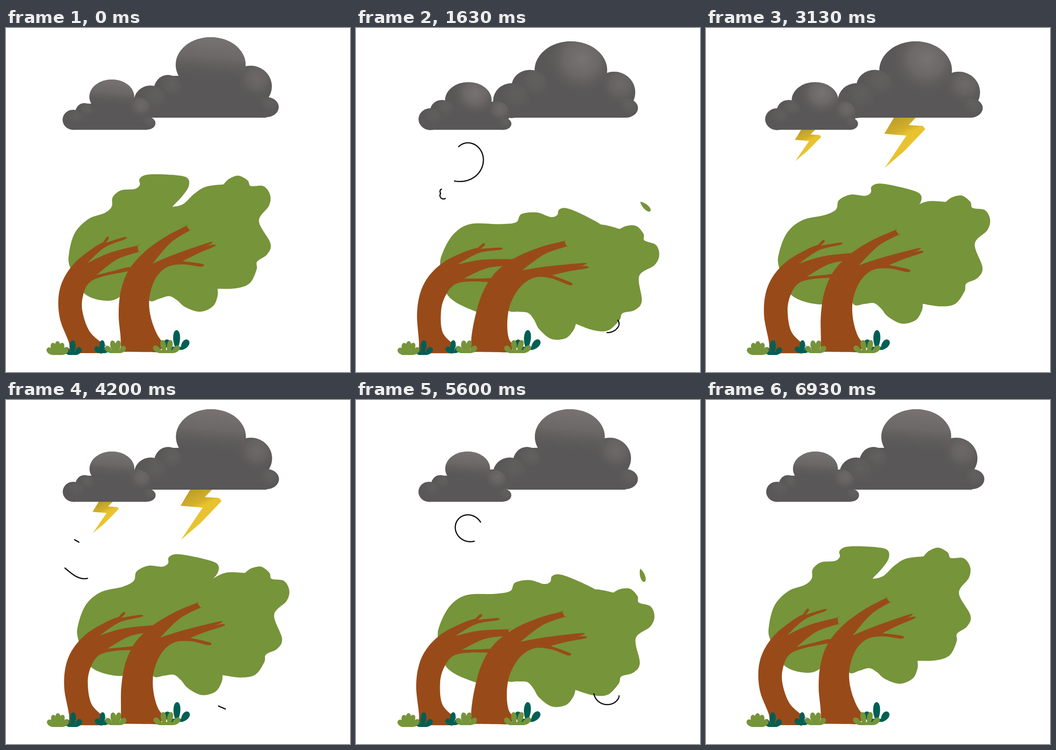
Animation of 748x748 px, one loop 7010 ms. Source, as an HTML page with a canvas:

```html
<!DOCTYPE html>
<html lang="en">
<head>
<meta charset="utf-8">
<title>Storm</title>
<style>
html, body { margin: 0; width: 100%; height: 100%; overflow: hidden; background: #fff; }
canvas { display: block; width: 100vw; height: 100vh; }
</style>
</head>
<body>
<canvas id="stage" width="748" height="748"></canvas>
<script>
const ctx = document.getElementById('stage').getContext('2d');
const LOOP = 7010, DEG = Math.PI / 180;
const GREEN = '#76943a', TEAL = '#005f54', BROWN = '#984b19', GREY = '#595757';

// Outlines of the resting trees; "!" marks a sharp corner.
const crownLeft = outline('217,593 170,577 140,522 137,490 150,445 180,415 215,402 230,388 232,368 250,353 280,350 291,341 290,329 302,320 330,318 378,321 396,328 397,345 383,366 362,388! 380,470 270,540 250,582');
const crownRight = outline('362,389! 385,383 410,360 435,345 473,340! 485,328 505,321 525,331 530,342 537,344 560,344 574,362 572,386 550,420 575,468 568,492 546,508 545,525 530,555 500,566 460,567! 460,583 450,605 422,617 390,607 372,592 355,583 335,588 312,593 300,560 310,460');
const trunkLeft = outline('136,707! 137,685 118,635 114,588 124,548 150,510 190,478 211,466! 220,454 224,457 217,467! 256,455 259,459 215,477 177,511! 225,489 286,473! 288,487! 240,504 197,537! 230,529 267,520 268,528 215,539 182,553 168,580 166,615 182,660 215,690! 205,707!');
const trunkRight = outline('250,704! 249,670 245,625 249,575 266,528 300,488 345,455 392,430! 400,440! 358,467 319,512! 370,491 443,466 445,470 434,475! 452,471 453,475 418,490 384,507! 427,513 424,519 385,514 350,520 325,545 312,585 314,625 328,665 346,690! 330,705!');

// How far each part leans, from 0 (rest) to 1 (strongest gust).
const BEATS = [0, 800, 1630, 3130, 4200, 5030, 5400, 6100, 6930];
const lean = {
  crownLeft: [0, .6, 1, .43, .39, .79, .95, .62, 0],
  crownRight: [0, .6, 1, .44, .42, .69, .9, .585, 0],
  trunkLeft: [0, .6, 1, .6, .62, .9, .95, .62, 0],
  trunkRight: [0, .5, 1, .32, .38, .84, .95, .79, 0]
};

// Curls of wind, one per gust: start times and duration in ms.
const winds = [
  { x: 277, y: 287, size: 1, fade: .45, from: 165, starts: [690, 4180], span: 2060 },
  { x: 198, y: 364, size: .55, fade: 1, from: 180, starts: [650, 4000], span: 1290 },
  { x: 572, y: 643, size: .88, fade: .45, from: 157, starts: [90, 4170], span: 1750 }
];

// Leaves are at x, y at time t and drift to the right.
const leaves = [
  { t: 1630, x: 629, y: 388, vy: -.06, angle: .75, colour: GREEN },
  { t: 2000, x: 660, y: 600, vy: .06, angle: .4, colour: GREEN },
  { t: 5030, x: 657, y: 403, vy: -.05, angle: 1, colour: TEAL },
  { t: 5030, x: 606, y: 508, vy: .04, angle: -.9, colour: GREEN },
  { t: 5030, x: 520, y: 404, vy: -.04, angle: .7, colour: GREEN },
  { t: 6100, x: 687, y: 635, vy: .12, angle: .15, colour: GREEN }
];

// colour, centre, ground, half width, height, blades
const bushes = [
  [TEAL, 145, 711, 17, 32, 3],
  [GREEN, 112, 711, 22, 30, 5],
  [TEAL, 209, 707, 14, 28, 3],
  [GREEN, 238, 707, 21, 29, 4],
  [TEAL, 371, 700, 25, 43, 3],
  [GREEN, 349, 707, 28, 30, 4]
];

// Ellipses of a cloud, the dome last.
const cloudShapes = {
  sharp: [[314, 160, 36, 35], [352, 136, 31, 34], [532, 127, 46, 45], [566, 172, 27, 22], [445, 80, 76, 60]],
  round: [[318, 158, 40, 38], [358, 127, 40, 36], [541, 140, 46, 45], [566, 174, 27, 21], [447, 92, 79, 63]]
};
const bolt = outline('404,188 379,230 427,234 380,304 422,268 468,220 463,213 432,211 454,188');

function outline(text) {
  return text.split(' ').flatMap(s => {
    const p = s.split(',').map(parseFloat);
    return s.endsWith('!') ? [p, p] : [p];
  });
}

function smooth(a, b, v) {
  const u = Math.max(0, Math.min(1, (v - a) / (b - a)));
  return u * u * (3 - 2 * u);
}

function leanAt(values, t) {
  const i = BEATS.findIndex(b => b > t);
  if (i < 0) return 0;
  return values[i - 1] + (values[i] - values[i - 1]) * smooth(BEATS[i - 1], BEATS[i], t);
}

function turn([x, y], [px, py], degrees, grow = 1) {
  const c = Math.cos(degrees * DEG) * grow, s = Math.sin(degrees * DEG) * grow;
  return [px + c * (x - px) - s * (y - py), py + s * (x - px) + c * (y - py)];
}

function fillCurve(pts, colour) {
  const n = pts.length, at = i => pts[(i + n) % n];
  ctx.beginPath();
  ctx.moveTo(...pts[0]);
  for (let i = 0; i < n; i++) {
    const [a, p, q, c] = [at(i - 1), at(i), at(i + 1), at(i + 2)];
    ctx.bezierCurveTo(p[0] + (q[0] - a[0]) / 6, p[1] + (q[1] - a[1]) / 6,
      q[0] - (c[0] - p[0]) / 6, q[1] - (c[1] - p[1]) / 6, q[0], q[1]);
  }
  ctx.fillStyle = colour;
  ctx.fill();
}

function drawTrees(t) {
  const b = {};
  for (const part in lean) b[part] = leanAt(lean[part], t);
  const leftRoot = [170, 695], rightRoot = [262, 690];
  // the free side of the left crown swings further than its windward side
  fillCurve(crownLeft.map(p => {
    const free = smooth(180, 250, p[0]);
    return turn(p, leftRoot, b.crownLeft * (14.3 + 9.7 * free), 1 + .05 * free * Math.sqrt(b.crownLeft));
  }), GREEN);
  fillCurve(crownRight.map(p => turn(p, [268, 653], 21.5 * b.crownRight)), GREEN);
  const trunk = (pts, root, bend) => fillCurve(pts.map(p =>
    turn(p, root, 13.5 * bend * smooth(705, 640, p[1]), 1 + .02 * bend)), BROWN);
  trunk(trunkLeft, leftRoot, b.trunkLeft);
  trunk(trunkRight, rightRoot, b.trunkRight);
  return b.trunkRight;
}

function blade(x, y, tx, ty, w, colour) {
  const dx = tx - x, dy = ty - y, len = Math.hypot(dx, dy);
  const nx = -dy / len * w, ny = dx / len * w;
  ctx.beginPath();
  ctx.moveTo(x, y);
  ctx.bezierCurveTo(x + dx * .4 + nx, y + dy * .4 + ny, tx + nx * .8, ty + ny * .8, tx, ty);
  ctx.bezierCurveTo(tx - nx * .8, ty - ny * .8, x + dx * .4 - nx, y + dy * .4 - ny, x, y);
  ctx.fillStyle = colour;
  ctx.fill();
}

function drawBush([colour, x, y, w, h, n], sway) {
  ctx.fillStyle = colour;
  ctx.fillRect(x - w * .55, y - 7, w * 1.1, 7);
  for (let i = 0; i < n; i++) {
    const u = i / (n - 1) * 2 - 1;
    blade(x + u * w * .4, y, x + u * w + 3 * sway, y - h * (1 - .5 * u * u), 4 + h / 6, colour);
  }
}

function drawLeaves(t) {
  ctx.save();
  ctx.beginPath();
  ctx.rect(0, 0, 683, 748);
  ctx.clip();
  for (const leaf of leaves) {
    const dt = t - leaf.t;
    if (dt < -450 || dt > 700) continue;
    const a = leaf.angle + dt * .001, c = Math.cos(a) * 15, s = Math.sin(a) * 15;
    const x = leaf.x + .18 * dt, y = leaf.y + leaf.vy * dt;
    blade(x - c, y - s, x + c, y + s, 8, leaf.colour);
  }
  ctx.restore();
}

// A stroke running inwards along a spiral that keeps its right edge in place.
function drawWind({ x, y, size, fade, from, starts, span }, t) {
  const u = (t - starts[t < starts[1] ? 0 : 1]) / span;
  if (u <= 0 || u >= 1) return;
  const turns = 10.5, tail = turns * u ** 3, head = turns * Math.min(1, 1.05 * u);
  ctx.beginPath();
  for (let k = 0; k <= 80; k++) {
    const s = tail + (head - tail) * k / 80, a = from * DEG - s;
    const r = size * (Math.max(14, 46 - fade * s * s) + 19 * Math.exp(-2 * s));
    ctx.lineTo(x - r + r * Math.cos(a), y + r * Math.sin(a));
  }
  ctx.strokeStyle = '#0c0c0c';
  ctx.lineWidth = 2.6;
  ctx.lineCap = ctx.lineJoin = 'round';
  ctx.stroke();
}

function drawBolt(t) {
  if (t < 2900 || t >= 4400) return;
  const g = ctx.createLinearGradient(400, 190, 425, 245);
  g.addColorStop(0, '#b89a2a');
  g.addColorStop(.6, '#d3b02c');
  g.addColorStop(.8, '#e9c32f');
  ctx.save();
  ctx.beginPath();
  ctx.rect(340, 185, 160, 130 * Math.min(1, (t - 2850) / 180));
  ctx.clip();
  ctx.beginPath();
  bolt.forEach(p => ctx.lineTo(...p));
  ctx.fillStyle = g;
  ctx.fill();
  ctx.restore();
}

function drawCloud(kind) {
  const lumps = cloudShapes[kind], dome = lumps[4];
  const fillLump = ([x, y, rx, ry], style) => {
    ctx.beginPath();
    ctx.ellipse(x, y, rx, ry, 0, 0, 7);
    ctx.fillStyle = style;
    ctx.fill();
  };
  ctx.fillStyle = GREY;
  ctx.fillRect(314, 150, 252, 45);
  ctx.fillRect(352, dome[1] + 24, 180, 60);
  lumps.forEach(l => fillLump(l, GREY));
  lumps.forEach((l, i) => {
    const [x, y, rx, ry] = l;
    const g = kind === 'sharp' && l === dome
      ? ctx.createLinearGradient(x, y - ry, x - 8, y + ry * .6)
      : ctx.createRadialGradient(x + rx * .3, y - ry * .4, 0, x + rx * .3, y - ry * .4, rx * 1.05);
    const strength = [.25, .3, .65, .3, 1][i];
    g.addColorStop(0, `rgba(120,115,114,${strength})`);
    g.addColorStop(.45, `rgba(112,108,107,${strength * .8})`);
    g.addColorStop(1, 'rgba(89,87,87,0)');
    fillLump(l, g);
  });
}

function drawSky(t) {
  const round = [[900, 1750], [2950, 3760], [4600, 5250]].some(([a, b]) => t >= a && t < b);
  const drift = 11 - 11 * Math.cos(t * Math.PI / 2000);
  // the near cloud is a smaller copy of the far one
  for (const [x, y, sx, sy] of [[0, 0, 1, 1], [-55.2, 99.5, .641, .625]]) {
    ctx.save();
    ctx.translate(x, y);
    ctx.scale(sx, sy);
    ctx.translate(drift, 0);
    drawBolt(t);
    drawCloud(round ? 'round' : 'sharp');
    ctx.restore();
  }
}

function draw(t) {
  ctx.fillStyle = '#fff';
  ctx.fillRect(0, 0, 748, 748);
  drawSky(t);
  drawLeaves(t);
  const sway = drawTrees(t);
  bushes.forEach(b => drawBush(b, sway));
  winds.forEach(w => drawWind(w, t));
}

const start = performance.now();
function tick() {
  const t = (performance.now() - start) % LOOP;
  // the picture steps at 0 and 30 ms of every tenth of a second
  const base = Math.floor(t / 100) * 100;
  draw(Math.min(6930, base + (t - base < 30 ? 0 : 30)));
  requestAnimationFrame(tick);
}
tick();
</script>
</body>
</html>
```
